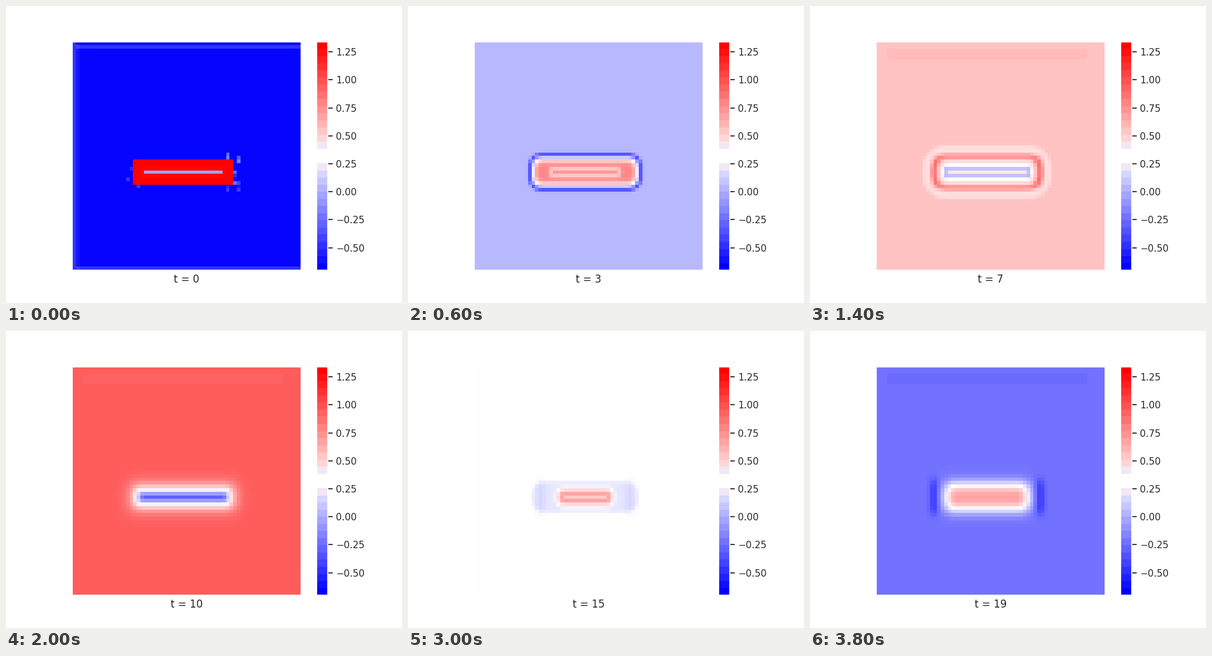
Recreate the animation shown at these times as a matplotlib script. Size 640x480 px, loop 4000 ms.

```python
import numpy as np
import matplotlib.pyplot as plt
from matplotlib.animation import FuncAnimation
from matplotlib.colors import ListedColormap
from matplotlib.ticker import MultipleLocator

N, STEPS = 64, 20
W, H = 640, 480
INK = "#262626"

plt.rcParams.update({"font.family": "DejaVu Sans", "axes.edgecolor": "white",
                     "axes.linewidth": 1.25, "text.color": INK,
                     "axes.labelcolor": INK})

row, col = np.mgrid[0:N, 0:N].astype(float)
dy, off = np.abs(row - 36), np.abs(col - 30.5)


def distance(half, power):
    """Distance to a horizontal bar; a high power squares its corners."""
    dx = np.maximum(off - half, 0)
    return (dx ** power + dy ** power) ** (1 / power)


def ring(amp, width, radius=0, half=10.5, power=2.5, sharp=2):
    d = distance(half, power)
    return amp * np.exp(-np.abs((d - radius) / width) ** sharp)


def caps(amp, x):
    """Crescents at both ends of the bar."""
    return amp * np.exp(-((off - x) / 1.3) ** 2 - (dy / 5) ** 4)


def band(amp):
    """Faint strip below the top edge."""
    return amp * ((row >= 2) & (row < 5) & (off < 28))


def frost():
    """Bright border lines and a few specks at the bar's corners."""
    z = 0.18 * ((row == 1) | (row == N - 1) | (col == 0)) + 0.06 * (col == 1)
    rng = np.random.default_rng(4)
    d = distance(10.5, 100)
    near = (d > 3.5) & (d < 5.5) & (off > 12)
    return z + near * (rng.random((N, N)) < 0.2) * rng.uniform(0.05, 0.5, (N, N))


# Signed intensity: -1 blue, 0 white, 1 red
keys = {
    0: -0.98 + ring(1.98, 3.5, power=100, sharp=40)
       + ring(-1.37, 0.5, power=100) + frost(),
    3: -0.28 + ring(0.75, 3.5, half=10.9, power=3, sharp=6)
       + ring(-0.25, 0.8, 0.9, half=8.5) + ring(-0.38, 0.5, 5, power=3),
    7: 0.24 + ring(-0.13, 7.6, sharp=20) + ring(-0.38, 0.7, 1.2)
       + ring(0.35, 0.9, 4.4) + caps(0.12, 14.5) + band(0.03),
    10: 0.64 + ring(-1.26, 2.8, half=11, sharp=1.5) + band(-0.03),
    12: 0.42 + ring(-1.02, 3, half=11, sharp=1.5),
    15: ring(-0.1, 4.4, sharp=12) + ring(0.46, 1.4, 0.9, half=5.5)
        + caps(-0.06, 12.5),
    19: -0.55 + ring(0.91, 4.2, half=8, sharp=2.5) + caps(-0.25, 14.8)
        + band(-0.03),
}
times = np.array(list(keys), float)
fields = np.array(list(keys.values()))
slopes = np.gradient(fields, times, axis=0)


def field_at(t):
    """Cubic Hermite interpolation through the key states."""
    i = min(np.searchsorted(times, t, side="right") - 1, len(times) - 2)
    h = times[i + 1] - times[i]
    u = (t - times[i]) / h
    z = ((1 + 2 * u) * (1 - u) ** 2 * fields[i]
         + u * (1 - u) ** 2 * h * slopes[i]
         + u * u * (3 - 2 * u) * fields[i + 1]
         + u * u * (u - 1) * h * slopes[i + 1])
    return np.clip(z, -1, 1)


def px_axes(x, w):
    return fig.add_axes([x / W, 0.11, w / W, 0.77])


fig = plt.figure(figsize=(W / 100, H / 100), dpi=100, facecolor="white")

ax = px_axes(107.2, 369.6)
mesh = ax.pcolormesh(field_at(0), cmap="bwr", vmin=-1, vmax=1)
ax.set(xlim=(0, N), ylim=(N, 0), xticks=[], yticks=[])
label = ax.set_xlabel("t = 0", fontsize=12)

shades = plt.get_cmap("bwr")(np.linspace(0, 1, 32))
shades[15:17] = 1
shades[[14, 17], :3] = np.array([242, 231, 243]) / 255

lo, hi = -0.7024, 1.3418
cax = px_axes(501.6, 18.48)
cax.pcolormesh([0, 1], np.linspace(lo, hi, 33), np.arange(32)[:, None],
               cmap=ListedColormap(shades), vmin=-0.5, vmax=31.5)
cax.set(xlim=(0, 1), ylim=(lo, hi), xticks=[])
cax.yaxis.tick_right()
cax.yaxis.set_major_locator(MultipleLocator(0.25))
cax.tick_params(axis="y", length=6, width=1.25, pad=3.5, color=INK,
                labelcolor=INK, labelsize=11)


def update(t):
    mesh.set_array(field_at(t))
    label.set_text(f"t = {t}")
    return mesh, label


anim = FuncAnimation(fig, update, frames=STEPS, interval=200,
                     repeat=True, repeat_delay=0, blit=False)
plt.show()
```
